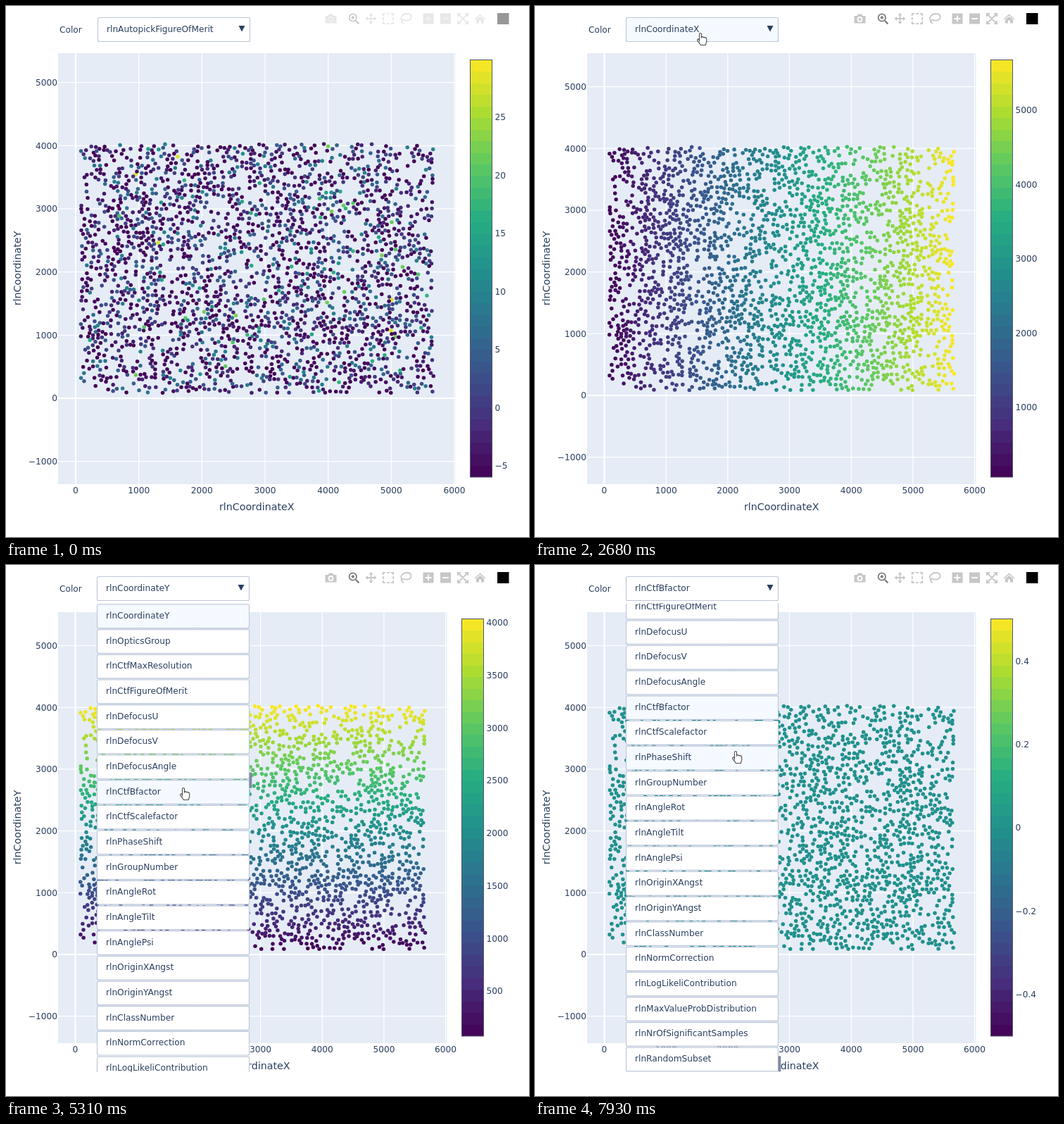
Write an HTML page with a canvas that moves like this. It is 743 px wide and 754 px high and loops after 8000 ms.

```html
<!DOCTYPE html>
<html lang="en">
<head>
<meta charset="utf-8">
<title>Scatter plot colour menu</title>
<style>
html, body { margin: 0; width: 100%; height: 100%; overflow: hidden; background: #fff; }
canvas { display: block; }
</style>
</head>
<body>
<canvas id="stage" width="743" height="754"></canvas>
<script>
const W = 743, H = 754, LOOP = 8000;
const INK = '#2a3f5f', HOVER = '#f4faff', EDGE = '#bec8d9';
const PITCH = 35.67, ROW = 33.6, MAX_SCROLL = 191.2;
const ctx = document.getElementById('stage').getContext('2d');

const VIRIDIS = '440154 472d7b 3b528b 2c728e 21918c 28ae80 5ec962 addc30 fde725'
  .split(' ').map(h => [0, 2, 4].map(i => parseInt(h.slice(i, i + 2), 16)));

const ITEMS = ('AutopickFigureOfMerit CoordinateX CoordinateY OpticsGroup CtfMaxResolution ' +
  'CtfFigureOfMerit DefocusU DefocusV DefocusAngle CtfBfactor CtfScalefactor PhaseShift ' +
  'GroupNumber AngleRot AngleTilt AnglePsi OriginXAngst OriginYAngst ClassNumber ' +
  'NormCorrection LogLikeliContribution MaxValueProbDistribution NrOfSignificantSamples ' +
  'RandomSubset').split(' ').map(s => 'rln' + s);

const WIDE = { x0: 99, y0: 557, k: 0.08967, right: 638.5, bar: 660, menu: 130.5 };
const SLIM = { x0: 98.5, y0: 553, k: 0.08768, right: 626.5, bar: 648, menu: 129.5 };

// Each view lasts from one pick to the next. The hand enters over the button,
// the menu opens, and the hand leaves the button for a row.
const VIEWS = [
  { from: 0, item: 0, lay: WIDE, lo: -6, hi: 29.9, step: 5, val: p => p.v,
    enter: 1170, open: 1890, leave: 1980, arrive: 2370, button: [221, 46], row: [228, 112] },
  { from: 2520, item: 1, lay: SLIM, lo: 62, hi: 5673, step: 1000, val: p => p.x,
    enter: 2520, open: 3130, leave: 3150, arrive: 3550, button: [237, 47], row: [223, 122] },
  { from: 4050, item: 2, lay: SLIM, lo: 72, hi: 4030, step: 500, val: p => p.y,
    enter: 4440, open: 4400, leave: 4440, arrive: 4930, button: [240, 46], row: [254, 325] },
  { from: 6040, item: 9, lay: SLIM, lo: -0.5, hi: 0.5, step: 0.2, val: () => 0,
    enter: 6770, open: 6990, leave: 7560, arrive: 7930, button: [291, 50], row: [287, 273] }
];

const clamp = f => Math.max(0, Math.min(1, f));
const easeOut = f => 1 - (1 - clamp(f)) ** 3;
const mix = (a, b, f) => a.map((v, i) => v + (b[i] - v) * f);

function viridis(f) {
  const p = clamp(f) * (VIRIDIS.length - 1), i = Math.min(VIRIDIS.length - 2, Math.floor(p));
  return `rgb(${mix(VIRIDIS[i], VIRIDIS[i + 1], p - i).map(Math.round)})`;
}

function random(seed) {
  return () => {
    seed = (seed + 0x6d2b79f5) | 0;
    let r = Math.imul(seed ^ (seed >>> 15), 1 | seed);
    r = (r + Math.imul(r ^ (r >>> 7), 61 | r)) ^ r;
    return ((r ^ (r >>> 14)) >>> 0) / 4294967296;
  };
}

// Picks keep a small distance; some settle beside an earlier one, forming clumps.
function makePoints(count) {
  const rnd = random(41), gap = 50 ** 2;
  const pts = [[1305, 2465], [950, 3545], [1617, 3825], [5008, 1560], [4996, 1070]]
    .map(([x, y]) => ({ x, y, v: 28 }));
  while (pts.length < count) {
    let x = 70 + 5600 * rnd(), y = 85 + 3940 * rnd();
    if (rnd() < 0.35) {
      const p = pts[Math.floor(rnd() * pts.length)], a = 6.283 * rnd(), d = 50 + 40 * rnd();
      x = p.x + d * Math.cos(a);
      y = p.y + d * Math.sin(a);
    }
    if (x < 70 || x > 5670 || y > 4025 || y < Math.max(85, 260 - x * 0.35)) continue;
    if (pts.some(p => (p.x - x) ** 2 + (p.y - y) ** 2 < gap)) continue;
    const strong = rnd() < 0.03;
    pts.push({ x, y, v: strong ? 8 + 15 * rnd() : -6 + 16 * rnd() ** 2.6 });
  }
  return pts;
}
const points = makePoints(2300);

function text(c, s, x, y, align = 'left', size = 12.2) {
  c.font = `${size}px "DejaVu Sans", Verdana, sans-serif`;
  c.textAlign = align;
  c.fillStyle = INK;
  c.fillText(s, x, y + size * 0.365);
}
const label = n => String(n).replace('-', '\u2212');

function drawBar(c, { lo, hi, step, lay: { bar } }) {
  const top = 77, len = 592, bands = 36;
  const yAt = f => top + len * (1 - f);
  for (let i = 0; i < bands; i++) {
    const y = Math.round(yAt((i + 1) / bands));
    c.fillStyle = viridis((i + 0.5) / bands);
    c.fillRect(bar, y, 31, Math.round(yAt(i / bands)) - y);
  }
  c.strokeStyle = '#50546c';
  c.strokeRect(bar - 0.5, top - 0.5, 31, len + 0.5);
  for (let n = Math.ceil(lo / step); n * step <= hi; n++) {
    text(c, label(+(n * step).toFixed(1)), bar + 34.5, yAt((n * step - lo) / (hi - lo)));
  }
}

function drawPlot(view) {
  const cv = document.createElement('canvas');
  cv.width = W; cv.height = H;
  const c = cv.getContext('2d');
  const { x0, y0, k, right } = view.lay;
  const px = x => x0 + x * k, py = y => y0 - y * k;

  c.fillStyle = '#fff';
  c.fillRect(0, 0, W, H);
  c.fillStyle = '#e5ecf6';
  c.fillRect(74, 67, right - 74, 612);
  for (let n = -1; n <= 6; n++) {
    const v = n * 1000, w = n ? 1.2 : 2.1;
    c.fillStyle = '#fff';
    if (n >= 0) c.fillRect(px(v) - w / 2, 67, w, 612);
    if (n <= 5) c.fillRect(74, py(v) - w / 2, right - 74, w);
    if (n >= 0) text(c, v, px(v), 688, 'center');
    if (n <= 5) text(c, label(v), 73, py(v), 'right');
  }
  for (const p of points) {
    c.fillStyle = viridis((view.val(p) - view.lo) / (view.hi - view.lo));
    c.beginPath();
    c.arc(px(p.x), py(p.y), 2.75, 0, 7);
    c.fill();
  }
  text(c, 'rlnCoordinateX', (74 + right) / 2, 711, 'center', 14.25);
  c.save();
  c.translate(16, 372.5);
  c.rotate(-Math.PI / 2);
  text(c, 'rlnCoordinateY', 0, 0, 'center', 14.25);
  c.restore();
  text(c, 'Color', 76, 34);
  drawBar(c, view);
  return cv;
}
for (const v of VIEWS) v.image = drawPlot(v);

// toolbar glyphs: centre x, fill path, stroke path, white stroke path
const ICONS = [
  [461.5, 'M-8-4h4l1.5-2.5h5L4-4h4V6.5H-8Z', '', 'M3 1a3 3 0 1 1-6 0a3 3 0 1 1 6 0'],
  [494, 'M2.2 3.8 3.8 2.2 8.2 6.4 6.4 8.2Z', 'M4-1.5a5.2 5.2 0 1 1-10.4 0a5.2 5.2 0 1 1 10.4 0M-3.5-1.5h4.6M-1.2-3.8v4.6', ''],
  [518.5, 'M0-8 3-4.5H-3ZM0 8 3 4.5H-3ZM-8 0-4.5-3V3ZM8 0 4.5-3V3Z', 'M0-6V6M-6 0H6', ''],
  [543, '', 'M-7.2-4v-3.2h3.2M-2-7.2h4M4-7.2h3.2v3.2M7.2-2v4M7.2 4v3.2H4M2 7.2h-4M-4 7.2h-3.2V4M-7.2 2v-4', ''],
  [568, '', 'M-4.6 3.2C-10-1-4.5-7 1.5-7C10-7 9 1.5 2.5 2.5C-1 3-3.5.5-5.5 2.2C-8 5-4 4.5-3.5 7.5', ''],
  [600, 'M-7.5-7.5h15v15h-15Z', '', 'M-4.5 0h9M0-4.5v9'],
  [624.5, 'M-7.5-7.5h15v15h-15Z', '', 'M-4.5 0h9'],
  [649, '', 'M-7.2-3v-4.2h4.2M3-7.2h4.2V-3M7.2 3v4.2H3M-3 7.2h-4.2V3M-7-7 7 7M7-7-7 7', ''],
  [673.5, 'M0-6.5 8 .5 7 1.6 0-4.4-7 1.6-8 .5ZM0-3.2 5.5 1.5V6.5H1.5V2.5h-3v4h-4V1.5Z', '', '']
].map(([x, ...d]) => [x, ...d.map(s => new Path2D(s))]);

function drawToolbar(alpha) {
  ctx.save();
  ctx.globalAlpha = alpha;
  ICONS.forEach(([x, fill, stroke, white], i) => {
    ctx.save();
    ctx.translate(x, 18);
    ctx.fillStyle = ctx.strokeStyle = i === 1 ? '#7c7c7c' : '#c7c7c7';
    ctx.lineWidth = 1.8;
    ctx.fill(fill);
    ctx.stroke(stroke);
    ctx.strokeStyle = '#fff';
    ctx.stroke(white);
    ctx.restore();
  });
  ctx.fillStyle = '#000';
  ctx.fillRect(698, 10, 16.5, 16);
  ctx.restore();
}

function box(x, y, h, lit) {
  ctx.beginPath();
  ctx.roundRect(x, y, 216, h, 2);
  ctx.fillStyle = lit ? HOVER : '#fff';
  ctx.fill();
  ctx.strokeStyle = EDGE;
  ctx.lineWidth = 1.2;
  ctx.stroke();
}

function drawHeader({ item, lay: { menu: x } }, tip) {
  box(x, 16.5, 34, tip > 16 && tip < 50.5);
  text(ctx, ITEMS[item], x + 12.5, 32.6);
  ctx.beginPath();
  ctx.moveTo(x + 200, 28);
  ctx.lineTo(x + 209, 28);
  ctx.lineTo(x + 204.5, 36.5);
  ctx.fill();
}

function drawMenu({ item, lay: { menu: x } }, alpha, tip) {
  const scroll = Math.min(item * PITCH, MAX_SCROLL);
  ctx.save();
  ctx.globalAlpha = alpha;
  ctx.beginPath();
  ctx.rect(x - 2, 54.5, 226, 665.5);
  ctx.clip();
  ITEMS.forEach((name, i) => {
    const y = 56 + i * PITCH - scroll;
    box(x, y, ROW, i === item || (tip > y && tip < y + ROW));
    text(ctx, name, x + 12.5, y + 15.5);
  });
  ctx.beginPath();
  ctx.roundRect(x + 216, 55 + 642 * scroll / MAX_SCROLL, 3.8, 22.5, 1.5);
  ctx.fillStyle = '#808ba4';
  ctx.fill();
  ctx.restore();
}

const HAND = new Path2D('M-3.5 2V-7a1.5 1.5 0 0 1 3 0V-2.6a1.4 1.4 0 0 1 2.6.3' +
  'a1.4 1.4 0 0 1 2.4.6a1.3 1.3 0 0 1 2.2.9V3.5L5.3 8.5H-1.6L-6.3 1.9a1.4 1.4 0 0 1 2.2-1.6Z');
function drawHand([x, y]) {
  ctx.save();
  ctx.translate(x, y);
  ctx.fillStyle = '#fff';
  ctx.fill(HAND);
  ctx.strokeStyle = '#4a4a4a';
  ctx.lineWidth = 1.1;
  ctx.stroke(HAND);
  ctx.restore();
}

// null while the pointer is hidden over the plot
function handAt(t, view, last) {
  if (t >= view.leave) {
    return mix(view.button, view.row, easeOut((t - view.leave) / (view.arrive - view.leave)));
  }
  const since = t - view.from;
  if (t >= view.enter) {
    return last && view.enter === view.from
      ? mix(last.row, view.button, easeOut(since / 150)) : view.button;
  }
  return last && since < 150 ? last.row : null;
}

function draw(t) {
  const now = VIEWS.filter(v => v.from <= t).length - 1;
  const view = VIEWS[now], last = VIEWS[now - 1];
  const hand = handAt(t, view, last);
  const tip = hand ? hand[1] - 8 : -1;
  const opening = clamp((t - view.open) / 200);
  const closing = last ? 0.25 * clamp(1 - (t - view.from) / 90) : 0;

  ctx.drawImage(view.image, 0, 0);
  drawToolbar(Math.max(clamp(0.41 - t / 600), clamp((t - 760) / 270)));
  drawHeader(view, tip);
  if (opening) drawMenu(view, opening, tip);
  if (closing) drawMenu({ item: last.item, lay: view.lay }, closing, tip);
  if (hand) drawHand(hand);
}

const start = performance.now();
function tick() {
  draw((performance.now() - start) % LOOP);
  requestAnimationFrame(tick);
}
tick();
</script>
</body>
</html>
```
